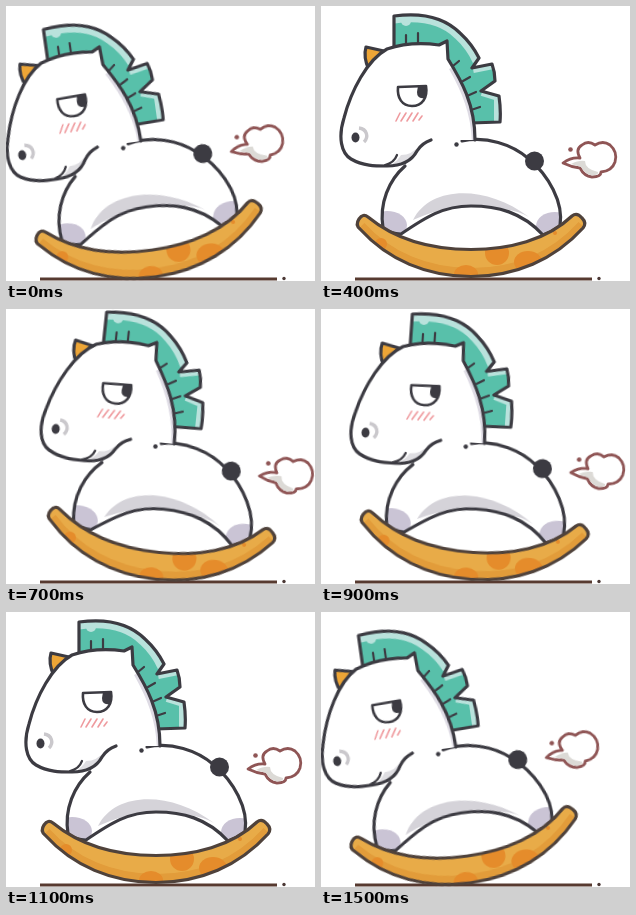
These frames come from a looping animation (309 by 275 pixels, 1600 ms). An HTML page:

```html
<!DOCTYPE html>
<html lang="en">
<head>
<meta charset="utf-8">
<title>Rocking horse</title>
<style>
  html, body { margin: 0; width: 100%; height: 100%; overflow: hidden; background: #fff; }
  svg { display: block; width: 309px; height: 275px; }
  .line { fill: none; stroke: #3c3b42; stroke-width: 3.2; stroke-linecap: round; stroke-linejoin: round; }
  .thin { stroke-width: 2.2; }
  .ink { fill: #3c3b42; }
  .shade { fill: #d5d3d9; }
  .hoof { fill: #cac4d5; }
  .spot { fill: #e58c2b; }
  /* Eight held poses, rocked there and back around the point touching the floor */
  #horse {
    transform-origin: 152px 271px;
    animation: rock 800ms steps(8, jump-none) -1ms infinite alternate;
  }
  @keyframes rock {
    from { transform: rotate(-8deg); }
    to { transform: rotate(6deg); }
  }
</style>
</head>
<body>
<svg viewBox="0 0 309 275">
  <defs>
    <path id="mane" d="M73 10C102 6 124 12 139 27Q151 38 158 52L151 62L171 58Q174 66 174 75L160 85L178 90Q180 104 179 116L150 117L120 60L73 48Z"/>
    <path id="head" d="M126 35L118 39Q90 35 66 43C46 54 30 85 23 112C17 131 20 147 30 153C42 160 54 160 66 160Q88 160 96 145Q101 137 110 134L154 134C154 98 140 74 127 53Z"/>
    <path id="body" d="M111 134L141 135C165 130 191 138 208 153C227 169 243 196 239 220Q231 226 222 229C201 206 176 200 150 200C122 200 105 211 80 228Q70 228 62 222C58 197 68 174 84 160Z"/>
    <path id="rocker" d="M47 211Q42 207 38 213Q34 219 39 223C67 254 106 270.5 150 270.5C194 270.5 233 254 262 222Q266 217 261 212Q256 206 251 210C226 234 188 243.5 150 243.5C112 243.5 75 234 47 211Z"/>
    <clipPath id="inMane"><use href="#mane"/></clipPath>
    <clipPath id="inHead"><use href="#head"/></clipPath>
    <clipPath id="inBody"><use href="#body"/></clipPath>
    <clipPath id="inRocker"><use href="#rocker"/></clipPath>
  </defs>

  <path d="M34 273H271" stroke="#573a30" stroke-width="3"/>
  <circle cx="278" cy="272.5" r="1.7" fill="#4b3835"/>

  <g id="horse">
    <g id="puff" stroke="#8f5555" stroke-width="2.8" stroke-linejoin="round">
      <path id="cloud" fill="#fff" d="M242 157Q250 151 259 152Q254 143 261 139Q267 134 274 139Q282 134 289 139Q297 146 294 156Q291 165 280 166Q280 171 271 171Q263 170 259 162Q250 161 242 157Z"/>
      <path d="M250 158Q258 154 264 155Q264 163 277 166Q278 169 271 169.500Q264 168 260 161Z" fill="#dcdad6" stroke="none"/>
      <circle cx="249.5" cy="143.5" r="2.3" fill="#8f5555" stroke="none"/>
    </g>

    <g id="crest">
      <use href="#mane" fill="#58c0aa"/>
      <g clip-path="url(#inMane)" fill="none" stroke="#b9e2dc">
        <path d="M73 13C102 9 123 15 137 29Q149 40 156 55" stroke-width="9"/>
        <path d="M152 63L172 59M161 86L177 91V117" stroke-width="8"/>
        <circle cx="85" cy="15" r="5" fill="#b9e2dc" stroke="none"/>
      </g>
      <use href="#mane" class="line"/>
      <path class="line thin" d="M85 29V38M97 27V37M132 60L138 55M142 75L149 71M146 90L155 86M150 104L159 101"/>
    </g>

    <path id="ear" d="M45 41L63 45L48 64Q42 51 45 41Z" fill="#eda536"/>
    <path d="M61 46Q52 49 48 61L54 56Z" fill="#d97d27"/>
    <use href="#ear" class="line" style="fill-opacity:0"/>

    <g id="torso">
      <use href="#body" fill="#fff"/>
      <g clip-path="url(#inBody)">
        <path class="shade" d="M92 214C110 179 165 179 208 211C195 203 172 201 150 201C125 201 108 207 92 214Z"/>
        <ellipse class="hoof" cx="66" cy="219" rx="20" ry="14"/>
        <ellipse class="hoof" cx="234" cy="220" rx="19" ry="14"/>
      </g>
      <path class="line" d="M141 135C165 130 191 138 208 153C227 169 243 196 239 220Q231 226 222 229C201 206 176 200 150 200C122 200 105 211 80 228Q70 228 62 222C58 197 68 174 84 160"/>
      <circle class="ink" cx="213.5" cy="155" r="9.5"/>
    </g>

    <g id="runner">
      <use href="#rocker" fill="#e8ab48"/>
      <g clip-path="url(#inRocker)">
        <path d="M39 221C67 252 106 268 150 268C194 268 233 252 262 220" fill="none" stroke="#e29c3a" stroke-width="12"/>
        <g class="spot">
          <circle cx="60" cy="238" r="6"/>
          <circle cx="234" cy="227" r="2"/>
          <ellipse cx="145" cy="268" rx="12" ry="9"/>
          <circle cx="176" cy="247" r="12"/>
          <ellipse cx="207" cy="256" rx="14" ry="11"/>
        </g>
      </g>
      <use href="#rocker" class="line" style="stroke:#4f423b"/>
    </g>

    <g id="face">
      <use href="#head" fill="#fff"/>
      <g clip-path="url(#inHead)">
        <path d="M68 160Q76 156 80 149Q91 149 99 139L107 135L92 160Z" fill="#dfdee2"/>
        <path d="M130 62C143 85 152 107 153 134" fill="none" stroke="#dedbe4" stroke-width="4.5"/>
      </g>
      <path class="line" d="M110 134Q101 137 96 145Q88 160 66 160C54 160 42 160 30 153C20 147 17 131 23 112C30 85 46 54 66 43Q90 35 118 39L126 35L127 53C140 74 154 98 154 134"/>
      <path class="line thin" d="M64 159Q73 157 76 149"/>
      <circle class="ink" cx="135.5" cy="138.5" r="2.2"/>

      <path id="eye" d="M77 81L105 80C107 92 101 100 91 100C81 100 76 92 77 81Z" fill="#fff"/>
      <path class="ink" d="M97 80H105Q108 88 103 92Q96 93 96 86Z"/>
      <use href="#eye" class="line" style="fill-opacity:0;stroke-width:2.6"/>

      <path d="M79 107L75 115M85 107L80 115M91 107L86 115M97 107L92 115M101 110L98 114" fill="none" stroke="#ef9b9f" stroke-width="1.6" stroke-linecap="round"/>
      <path d="M38 122C46 123 48 131 43 136" fill="none" stroke="#cac8cc" stroke-width="3.4"/>
      <ellipse class="ink" cx="34.500" cy="131.500" rx="4" ry="5"/>
    </g>
  </g>
</svg>
</body>
</html>
```
